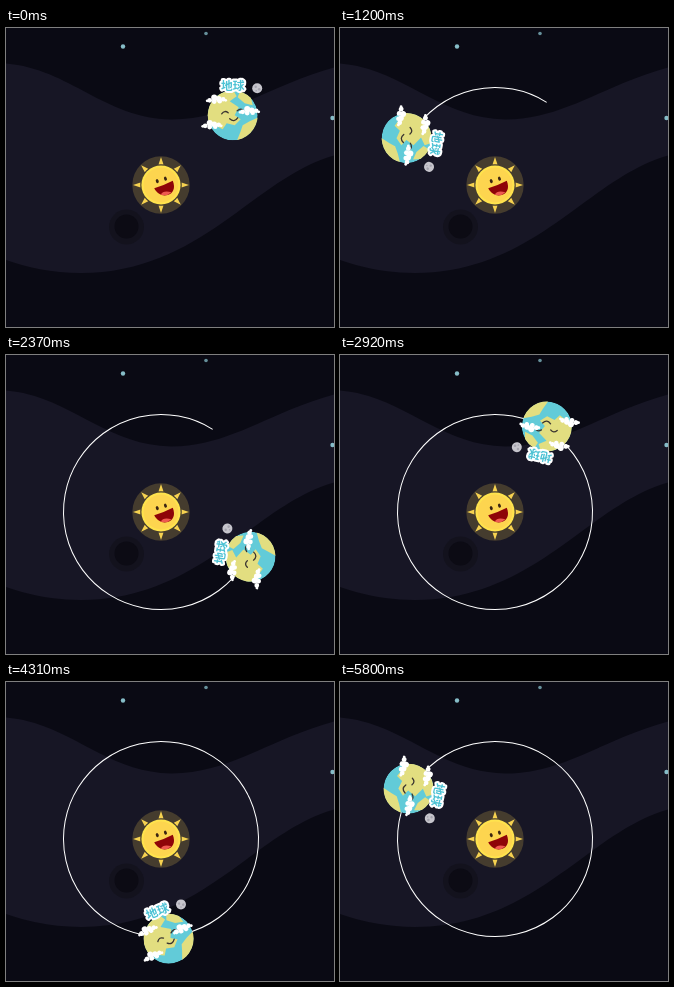
Animation of 328x299 px, one loop 5.9 s. Source, as an HTML page:

```html
<!DOCTYPE html>
<html lang="zh">
<head>
<meta charset="utf-8">
<title>地球公转</title>
<style>
  html, body { margin: 0; width: 100%; height: 100%; overflow: hidden; background: #0a0a14; }
  svg { display: block; width: 100vw; height: 100vh; }
  .label { font: 700 11.8px "Noto Sans CJK SC", "Noto Sans CJK", sans-serif; text-anchor: middle;
           fill: #4cc2d4; stroke: #fff; stroke-width: 4.2; stroke-linejoin: round; paint-order: stroke; }
  .line { fill: none; stroke: #3a3430; stroke-width: 1.3; stroke-linecap: round; }
</style>
</head>
<body>
<svg viewBox="0 0 328 299">
  <defs>
    <g id="cloud" fill="#fff">
      <circle cx="-6.5" cy="1" r="2.4"/><circle cx="-2" cy="-1.8" r="3"/>
      <circle cx="2.5" cy="-.5" r="2.8"/><circle cx="7" cy="0" r="2.3"/>
      <circle cx="-2" cy="2.2" r="2.4"/><circle cx="3.5" cy="2" r="2.3"/>
      <circle cx="-9" cy="1.5" r="1.4"/><circle cx="9.5" cy="1" r="1.4"/>
    </g>
    <path id="ray" d="M-2.5 -20.5L0 -28L2.5 -20.5Z" fill="#f6d250"/>
    <clipPath id="globe"><circle r="25"/></clipPath>
  </defs>

  <rect width="328" height="299" fill="#0a0a14"/>
  <path fill="#171625" d="M0 35.5C64 41 98 90 165 91.5C222 92 264 57 328 39.5V127.5C248 150 195 245 75 245C46 245 20 239 0 232Z"/>
  <circle cx="120.5" cy="199" r="17.5" fill="#13121d"/>
  <circle cx="120.5" cy="198.5" r="12" fill="#0c0b14"/>
  <g fill="#86bdc8">
    <circle cx="117" cy="18.5" r="2.2"/>
    <circle cx="200" cy="5.5" r="1.8" opacity=".75"/>
    <circle cx="326.5" cy="90" r="2.2"/>
  </g>

  <circle id="trail" r="97.5" pathLength="360" transform="translate(155 157) rotate(-58) scale(1 -1)"
          fill="none" stroke="#fff"/>

  <g transform="translate(155 157)">
    <circle r="28.7" fill="#453c2e"/>
    <g id="rays"></g>
    <circle r="20.5" fill="#453c2e"/>
    <circle r="19.6" fill="#ffe34d"/>
    <circle r="17.4" fill="#fdd54f"/>
    <g transform="rotate(-22)">
      <ellipse cx="-2" cy="-5" rx="1.4" ry="2.1" fill="#3b2412"/>
      <ellipse cx="6.5" cy="-4.2" rx="1.4" ry="2.1" fill="#3b2412"/>
      <path d="M-7.5 0.5Q2 1.5 12.5 0.5C12.5 8.5 8 12.5 2.5 11.8S-7 7 -7.5 0.5Z" fill="#8e0408"/>
      <path d="M-4 9Q0 5.2 7 10.6Q1.5 13 -4 9Z" fill="#ee5a50"/>
    </g>
  </g>

  <g id="earth">
    <g clip-path="url(#globe)">
      <circle r="25" fill="#62cbd8"/>
      <g fill="#e2de80">
        <path d="M-26 -2L-22 -14L-12 -22L0 -26L4 -19L-3 -14L6 -8L2 0L8 4L2 10L-6 8L-10 14L-18 10L-24 8Z"/>
        <path d="M8 -26L18 -19L20 -10L12 -12L5 -18Z"/>
        <path d="M26 2L17 6L10 10L8 16L4 26H26Z"/>
      </g>
    </g>
    <path class="line" d="M-11 -1.5Q-8 -5.5 -4.5 -2.5M4.5 -4.5Q8.5 -8 11 -4.5M-3 3.5Q1.5 7.5 5 2.5"/>
    <use href="#cloud" x="-16.5" y="-16"/>
    <use href="#cloud" x="16.5" y="-4.5"/>
    <use href="#cloud" x="-21" y="9.5"/>
    <text class="label" y="-25.4">地球</text>
    <circle cx="24.5" cy="-27" r="5" fill="#c6c5cc"/>
    <g fill="#a5a4ae">
      <circle cx="23" cy="-28.5" r="1.2"/><circle cx="26.5" cy="-26" r="1.3"/><circle cx="23.5" cy="-24.6" r=".8"/>
    </g>
  </g>
</svg>
<script>
  const LOOP = 5900, START = 720, ORBIT = 100, TRAIL_START = -58;
  const poseTimes = [720, 840, 960, 1080, 1200, 1350, 1500, 1620, 1740, 1890, 2010, 2130, 2250, 2370,
    2520, 2650, 2800, 2920, 3070, 3220, 3340, 3460, 3620, 3770, 3920, 4070, 4190, 4310, 4460, 4590,
    4730, 4850, 5000, 5150, 5300, 5420, 5540, 5680, 5800];
  const trail = document.getElementById('trail');
  const earth = document.getElementById('earth');

  document.getElementById('rays').innerHTML = Array.from({ length: 8 },
    (_, i) => `<use href="#ray" transform="rotate(${i * 45})"/>`).join('');

  // Orbit angle in degrees, counterclockwise, slightly faster near the end.
  const orbitAngle = t => -152 - 0.1551 * (Math.min(t, 4310) - 1200) - 0.158 * Math.max(0, t - 4310);

  function draw(t) {
    const moving = t >= START;
    const time = moving ? poseTimes.findLast(p => p <= t) : 0;
    const angle = moving ? orbitAngle(time) : -44.2;
    const spin = moving ? angle - 108 : 0;
    const rad = angle * Math.PI / 180;
    const x = 155 + ORBIT * Math.cos(rad), y = 157 + ORBIT * Math.sin(rad);
    earth.setAttribute('transform', `translate(${x} ${y}) rotate(${spin})`);

    const sweep = Math.min(360, TRAIL_START - angle);
    trail.style.display = moving ? '' : 'none';
    trail.setAttribute('stroke-dasharray', sweep < 360 ? `${Math.max(0, sweep)} 400` : 'none');
  }

  const origin = performance.now();
  function tick() {
    draw((performance.now() - origin) % LOOP);
    requestAnimationFrame(tick);
  }
  tick();
</script>
</body>
</html>
```
